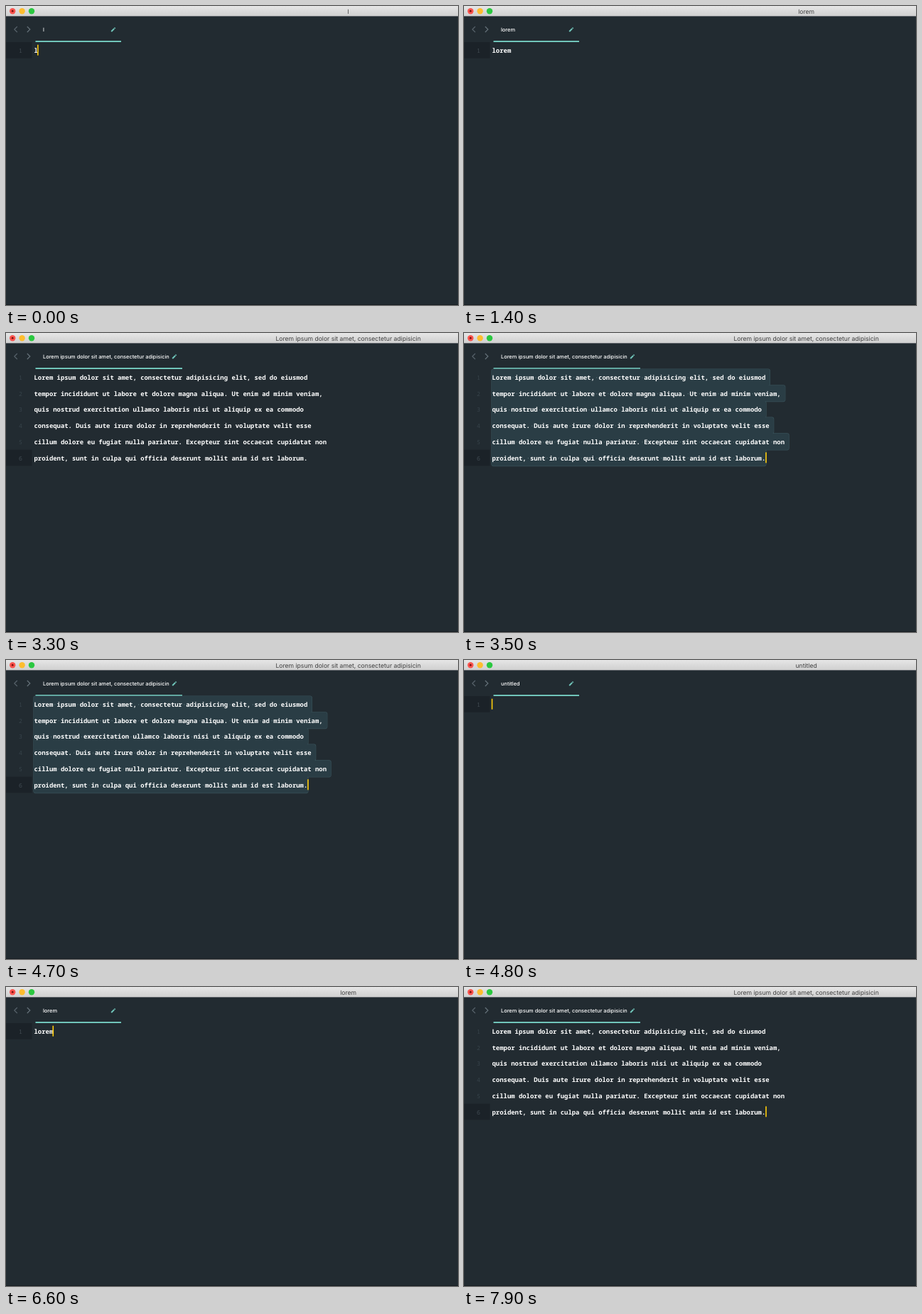
An HTML page with a canvas for the animation above (8000 ms loop, 636x422 px).

```html
<!DOCTYPE html>
<html lang="en">
<head>
<meta charset="utf-8">
<title>Editor</title>
<style>
  html, body { margin: 0; height: 100%; overflow: hidden; background: #222b31; }
  canvas { display: block; }
</style>
</head>
<body>
<canvas width="636" height="422"></canvas>
<script>
const LOOP = 8000;
const LEFT = 39.5, TOP = 51, ROW = 22.74, CHAR = 5.354;
const TEAL = '#70c5ba';
const MONO = '"Noto Sans Mono", "DejaVu Sans Mono", monospace';
const SANS = 'Inter, Roboto, sans-serif';
const LOREM = [
  'Lorem ipsum dolor sit amet, consectetur adipisicing elit, sed do eiusmod',
  'tempor incididunt ut labore et dolore magna aliqua. Ut enim ad minim veniam,',
  'quis nostrud exercitation ullamco laboris nisi ut aliquip ex ea commodo',
  'consequat. Duis aute irure dolor in reprehenderit in voluptate velit esse',
  'cillum dolore eu fugiat nulla pariatur. Excepteur sint occaecat cupidatat non',
  'proident, sunt in culpa qui officia deserunt mollit anim id est laborum.'
];

// [start time, lines, selected]; every key press restarts the caret blink
const EVENTS = [
  [0, ['l']], [200, ['lo']], [500, ['lor']], [700, ['lore']], [900, ['lorem']],
  [1800, LOREM], [3500, LOREM, true], [4800, ['']],
  [6100, ['l']], [6200, ['lo']], [6300, ['lor']], [6400, ['lore']], [6500, ['lorem']],
  [7700, ['lorem']], [7900, LOREM]
];

const ctx = document.querySelector('canvas').getContext('2d');
ctx.textRendering = 'geometricPrecision';

function rect(x, y, w, h, color) {
  ctx.fillStyle = color;
  ctx.fillRect(x, y, w, h);
}

function text(str, x, y, font, color, align = 'left') {
  ctx.font = font;
  ctx.fillStyle = color;
  ctx.textAlign = align;
  ctx.fillText(str, x, y);
}

function dot(x, y, r, color) {
  ctx.fillStyle = color;
  ctx.beginPath();
  ctx.arc(x, y, r, 0, 2 * Math.PI);
  ctx.fill();
}

function line(points, color, width) {
  ctx.strokeStyle = color;
  ctx.lineWidth = width;
  ctx.beginPath();
  points.forEach(p => ctx.lineTo(...p));
  ctx.stroke();
}

function caretAlpha(age) {
  const phase = age % 1000 / 100;
  if (age >= 1000 && phase < 1) return 0.5 + phase / 2;
  if (phase < 2.1) return 1;
  return Math.max(0, 1 - (phase - 2) / 3);
}

function titleBar(title) {
  const shade = ctx.createLinearGradient(0, 0, 0, 14);
  shade.addColorStop(0, '#e6e6e6');
  shade.addColorStop(1, '#d0d0d0');
  rect(0, 0, 636, 14, shade);
  rect(0, 14, 636, 0.6, '#8d9093');
  dot(9.2, 7.2, 4.2, '#f9544e');
  dot(9.2, 7.2, 1.4, '#7c0f0b');
  dot(22.6, 7.2, 4.2, '#fdbd2f');
  dot(36, 7.2, 4.2, '#2bc840');
  text(title, 481.6, 10.7, '8.6px ' + SANS, '#404040', 'center');
}

function tab(title, wide) {
  const end = wide ? 248 : 162, pen = end - 11;
  line([[15.8, 29], [11.8, 33], [15.8, 37]], '#56626a', 1.2);
  line([[29.8, 29], [33.8, 33], [29.8, 37]], '#65727a', 1.2);
  text(title, 52, 35.6, '500 7.4px ' + SANS, '#ffffff');
  line([[pen - 2.8, 36], [pen + 1.2, 32]], TEAL, 1.9);
  line([[pen + 1.6, 31.6], [pen + 2.6, 30.6]], TEAL, 1.9);
  rect(41.5, 49, end - 41.5, 2, TEAL);
}

function selection(lines) {
  const last = lines.length - 1, path = new Path2D();
  lines.forEach((str, i) => {
    const w = (str.length + (i < last)) * CHAR + 0.5;
    path.roundRect(LEFT - 0.5, TOP + i * ROW, w, ROW + 0.1,
      [i ? 0 : 2.5, 2.5, 2.5, i < last ? 0 : 2.5]);
  });
  ctx.strokeStyle = '#39525a';
  ctx.lineWidth = 1.2;
  ctx.stroke(path);
  ctx.fillStyle = '#2a3d45';
  ctx.fill(path);
  lines.forEach((str, i) => [...str].forEach((c, k) => {
    if (c === ' ') dot(LEFT + (k + 0.5) * CHAR, TOP + i * ROW + 12, 0.65, '#5b7279');
  }));
}

function editor(lines, selected, age) {
  const last = lines.length - 1, y = TOP + last * ROW;
  rect(0, y, 36.5, ROW, '#1b2228');
  if (selected) selection(lines);
  lines.forEach((str, i) => {
    const base = TOP + i * ROW + 14.8;
    text(i + 1, 22.8, base, '8.2px ' + MONO, i === last ? '#414b52' : '#37434a', 'right');
    text(str, LEFT, base, '600 8.92px ' + MONO, '#ffffff');
  });
  ctx.globalAlpha = caretAlpha(age);
  rect(LEFT + lines[last].length * CHAR - 0.8, y + 3.7, 1.6, 15, '#ffcc0a');
  ctx.globalAlpha = 1;
}

function draw() {
  const t = performance.now() % LOOP;
  const [start, lines, selected] = EVENTS.findLast(e => e[0] <= t);
  const title = lines[0].slice(0, 50) || 'untitled';
  rect(0, 0, 636, 422, '#222b31');
  rect(0, 421, 636, 1, '#171d21');
  titleBar(title);
  tab(title, lines.length > 1);
  editor(lines, selected, t - start);
  requestAnimationFrame(draw);
}
draw();
</script>
</body>
</html>
```
